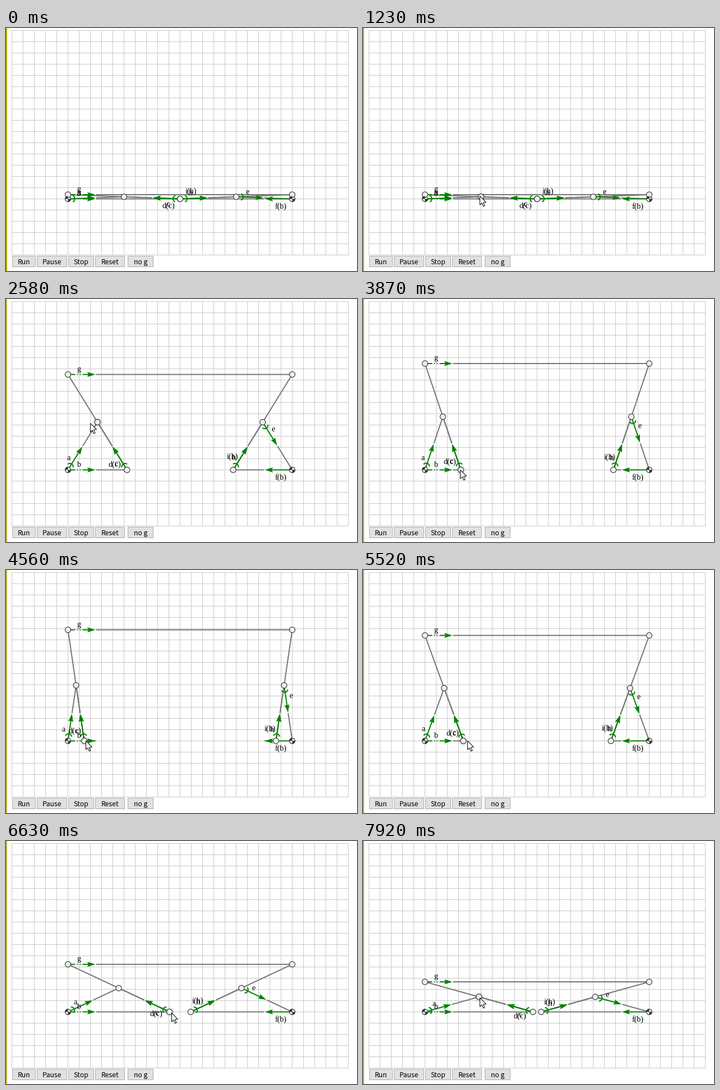
Recreate the animation shown at these times as a matplotlib script. Size 626 px wide and 433 px high, loop 8000 ms.

```python
import numpy as np
import matplotlib.pyplot as plt
from matplotlib.animation import FuncAnimation
from matplotlib.collections import LineCollection, PolyCollection
from matplotlib.patches import Circle, Polygon, Rectangle, Wedge

plt.rcParams["path.snap"] = False

W, H, DPI = 626, 433, 100
PX = 72 / DPI                      # points per pixel
LOOP, STEP, REDRAW = 8000, 20, 30
GREEN, GRAY, EDGE, FILL = "#008000", "#777777", "#333333", "#eeeeee"

A0 = np.array([110.5, 304.5])
B0 = np.array([510.5, 304.5])
ARM = 100                          # half length of each scissor bar


def smooth(u):
    return u * u * (3 - 2 * u)


def soft(u):
    return (u + smooth(u)) / 2


def ease_out(u):
    return 1 - (1 - u) ** 1.25


def bar_angle(height):
    return np.arcsin(height / (2 * ARM))


# drags of the mechanism: start, end, height of the top bar reached, easing
REST = 7.5
DRAGS = [(1230, 3000, 189.5, soft), (3870, 4590, 198, soft), (4710, 5490, 189.5, soft),
         (5490, 7110, 42, ease_out), (7650, 7920, 53.5, soft)]

# pointer stops: time, joint, offset from it
STOPS = [(1230, "P", (-2, -2)), (2580, "P", (-13, 2)), (3000, "P", (-13, 2)),
         (3600, "C", (-1, -1)), (3870, "C", (-1, -1)), (5520, "C", (7, -1)),
         (7110, "C", (2, 2)), (7230, "C", (2, 2)), (7500, "P", (0, 1)), (LOOP, "P", (1, 1))]

# label: (start, end, dashed, fork)
VECTORS = {
    "a": ("A0", "P", False, True),
    "b": ("A0", "C", True, False),
    "c": ("C", "P", False, True),
    "d(c)": ("C", "D", False, False),
    "e": ("Q", "B0", False, True),
    "f(b)": ("B0", "F", False, False),
    "g": ("D", "G", True, False),
    "h": ("F", "Q", False, True),
    "i(h)": ("F", "G", False, False),
}
SOLID = [(0, 38)]
DASHED = [(0, 13), (16, 18), (21, 23), (26, 38)]
HEAD = np.array([(48, 0), (35, 4), (37, 0), (35, -4)])
BEND = np.radians(np.linspace(-70, 70, 9))
FORK = np.column_stack([6.5 + 6 * np.cos(BEND), 6 * np.sin(BEND)])
ARROW = np.array([(0.5, 0.5), (0.5, 16.2), (4, 12.8), (6.5, 18.8), (9, 17.8),
                  (6.6, 12), (11.5, 11.6)])


def joints(t):
    w = bar_angle(REST)
    for start, end, height, ease in DRAGS:
        w += (bar_angle(height) - w) * ease(np.clip((t - start) / (end - start), 0, 1))
    c, s = ARM * np.cos(w), ARM * np.sin(w)
    return {"A0": A0, "B0": B0,
            "P": A0 + (c, -s), "C": A0 + (2 * c, 0), "D": A0 + (0, -2 * s),
            "Q": B0 + (-c, -s), "F": B0 + (-2 * c, 0), "G": B0 + (0, -2 * s)}


def pointer_state(t, pts):
    """Tip of the pointer and the joint it holds, if any."""
    if t < STOPS[0][0]:
        _, joint, offset = STOPS[0]
        far = (403 * np.exp((30 - t) / 105), -267 * np.exp((30 - t) / 190))
        return pts[joint] + offset + far, joint if t >= 840 else None
    for (t0, j0, off0), (t1, j1, off1) in zip(STOPS, STOPS[1:]):
        if t < t1:
            break
    k = smooth((t - t0) / (t1 - t0))
    tip = (1 - k) * (pts[j0] + off0) + k * (pts[j1] + off1)
    return tip, j0 if j0 == j1 else None


fig = plt.figure(figsize=(W / DPI, H / DPI), dpi=DPI, facecolor="white")
ax = fig.add_axes([0, 0, 1, 1])
ax.set(xlim=(0, W), ylim=(H, 0))
ax.axis("off")

# static page: border stripe, grid, buttons
stripe = ax.add_patch(Rectangle((0, 0), 2, H, lw=0))
grid = [[(x, 4), (x, 405)] for x in np.arange(10.5, 611, 20)]
grid += [[(10, y), (611, y)] for y in np.arange(4.5, 405, 20)]
ax.add_collection(LineCollection(grid, colors="#c9c9c9", lw=PX))

for caption, x0, x1 in [("Run", 11, 53), ("Pause", 55, 109), ("Stop", 111, 157),
                        ("Reset", 159, 212), ("no g", 217, 263)]:
    ax.add_patch(Rectangle((x0 + 0.5, 406.5), x1 - x0 - 1, 19, fc="#e1e1e1",
                           ec="#adadad", lw=PX))
    ax.text((x0 + x1) / 2, 421, caption, family="Noto Sans CJK JP", size=12.2 * PX,
            ha="center", va="baseline")

# moving parts
bars = ax.add_collection(LineCollection([], colors=GRAY, lw=2 * PX, zorder=3))
shafts = ax.add_collection(LineCollection([], colors=GREEN, lw=2 * PX, zorder=4))
heads = ax.add_collection(PolyCollection([], facecolors=GREEN, edgecolors=GREEN,
                                         lw=0.5 * PX, zorder=4))
halos = [ax.add_patch(Circle(A0, r, fc="black", alpha=0.035, lw=0, zorder=5))
         for r in (6.5, 8, 9.5)]
nodes = {name: ax.add_patch(Circle(p, 5, fc=FILL, ec=EDGE, lw=1.1 * PX, zorder=6))
         for name, p in joints(0).items()}
for base in (A0, B0):
    for start in (180, 0):
        ax.add_patch(Wedge(base, 5, start, start + 90, fc=EDGE, lw=0, zorder=7))
labels = {name: ax.text(0, 0, name, family="Liberation Serif", size=14 * PX,
                        ha="center", va="baseline", zorder=8) for name in VECTORS}
pointer = ax.add_patch(Polygon(ARROW, fc="white", ec="black", lw=PX, zorder=9))


def draw(i):
    t = (i * STEP + STEP // 2) // REDRAW * REDRAW
    pts = joints(t)
    bar_segs, shaft_segs, head_polys = [], [], []

    for name, (start, end, dashed, fork) in VECTORS.items():
        p, q = pts[start], pts[end]
        u = (q - p) / np.hypot(*(q - p))
        n = np.array([u[1], -u[0]])
        axes = np.array([u, n])

        bar_segs.append([p + 50 * u, q])
        shaft_segs += [[p + s * u, p + e * u] for s, e in (DASHED if dashed else SOLID)]
        if fork:
            shaft_segs.append(p + FORK @ axes)
        head_polys.append(p + HEAD @ axes)
        x, y = p + 20 * u + (13 if "(" in name else 10) * n
        labels[name].set_position((x - 0.5, y + 4.5))

    bars.set_segments(bar_segs)
    shafts.set_segments(shaft_segs)
    heads.set_verts(head_polys)
    for name, node in nodes.items():
        node.center = pts[name]

    tip, held = pointer_state(t, pts)
    pointer.set_visible(t >= 30)
    pointer.set_xy(ARROW + np.round(tip))
    for halo in halos:
        halo.set_visible(held is not None)
        halo.center = pts[held or "P"]
    stripe.set_facecolor("#b8b000" if t < 1230 else "#c0b83c")
    return ()


anim = FuncAnimation(fig, draw, frames=LOOP // STEP, interval=STEP,
                     init_func=lambda: draw(0), repeat=True, repeat_delay=0)
plt.show()
```
